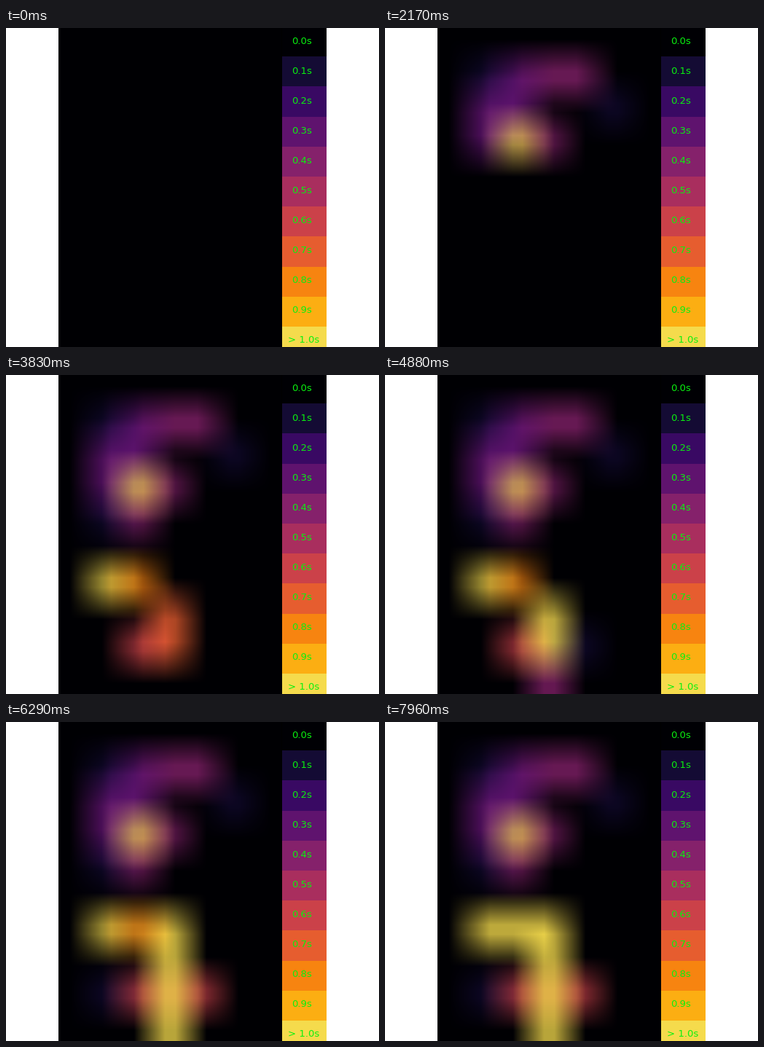
Write a matplotlib script that moves like this. It is 512x438 px and loops after 8000 ms.

```python
import numpy as np
import matplotlib.pyplot as plt
from matplotlib.animation import FuncAnimation
from matplotlib.patches import Rectangle

W, H, DPI = 512, 438, 100
LEFT, SPLIT, RIGHT = 72, 378, 440
ROWS, COLS = 10, 7
BLUR = 57
STEP_MS, LOOP_MS = 40, 8000
GREEN = (0.04, 0.94, 0.06)

# Legend levels, one per tenth of a second
COLORS = plt.get_cmap("inferno")(np.arange(11) / 11)[:, :3]

# Each walk: start ms, end ms, then legs of (first cell, last cell, tenths per cell)
WALKS = [
    (880, 1280, [((1, 1), (1, 1), 1), ((1, 2), (2, 2), 3), ((2, 1), (3, 1), 3),
                 ((3, 2), (3, 2), 10), ((3, 3), (3, 3), 4)]),
    (1310, 1660, [((1, 3), (1, 4), 4), ((2, 5), (2, 5), 1)]),
    (3000, 3800, [((4, 1), (4, 1), 1), ((4, 2), (4, 2), 4), ((6, 1), (6, 1), 10),
                  ((6, 2), (6, 2), 8), ((8, 2), (8, 2), 6), ((8, 3), (7, 3), 7)]),
    (3850, 4860, [((7, 3), (8, 3), 3), ((8, 4), (8, 4), 1), ((9, 3), (9, 3), 4)]),
    (4900, 6250, [((9, 3), (9, 3), 6), ((6, 3), (6, 3), 10),
                  ((8, 4), (8, 4), 5), ((8, 1), (8, 1), 1)]),
    (6330, 7100, [((6, 2), (6, 2), 2)]),
]


def walk_ticks(start, end, legs):
    """Spread a walk's tenths evenly over its time, cell after cell."""
    cells = []
    for (r0, c0), (r1, c1), tenths in legs:
        count = max(abs(r1 - r0), abs(c1 - c0)) + 1
        for row, col in zip(np.linspace(r0, r1, count), np.linspace(c0, c1, count)):
            cells += [(round(row), round(col))] * tenths
    return list(zip(np.linspace(start, end, len(cells)), cells))


TICKS = [tick for walk in WALKS for tick in walk_ticks(*walk)]


def blur_weights(size, cells):
    """Box-blurred profile of every cell along one axis."""
    cell = np.arange(size) * cells // size
    half = BLUR // 2
    padded = np.pad(np.eye(cells)[cell], ((half, half), (0, 0)), mode="edge")
    box = np.full(BLUR, 1 / BLUR)
    return np.stack([np.convolve(p, box, "valid") for p in padded.T], axis=1)


ROW_W = blur_weights(H, ROWS)
COL_W = blur_weights(SPLIT - LEFT, COLS)


def heat_at(ms):
    levels = np.zeros((ROWS, COLS), int)
    for when, cell in TICKS:
        if when <= ms:
            levels[cell] += 1
    cells = COLORS[np.minimum(levels, 10)]
    channels = [ROW_W @ cells[..., k] @ COL_W.T for k in range(3)]
    return np.clip(np.stack(channels, axis=-1), 0, 1)


def draw_legend(ax):
    for k, color in enumerate(COLORS):
        top = max(0, round(41.2 * k - 2))
        ax.add_patch(Rectangle((SPLIT + 1, top), RIGHT - SPLIT - 1, H - top,
                               color=color, lw=0, zorder=2, antialiased=False))
        label, x = (f"0.{k}s", 406.3) if k < 10 else ("> 1.0s", 408.8)
        ax.text(x, 21.5 + 41.1 * k, label, color=GREEN, ha="center",
                va="baseline", family="DejaVu Sans", size=13.2 * 72 / DPI, zorder=3)


fig = plt.figure(figsize=(W / DPI, H / DPI), dpi=DPI, facecolor="white")
ax = fig.add_axes([0, 0, 1, 1])
ax.add_patch(Rectangle((LEFT, 0), RIGHT - LEFT, H, color="black", lw=0, zorder=0))
heat = ax.imshow(heat_at(0), extent=(LEFT, SPLIT, H, 0), aspect="auto",
                 interpolation="nearest", zorder=1)
draw_legend(ax)
ax.set_xlim(0, W)
ax.set_ylim(H, 0)
ax.axis("off")


def update(frame):
    heat.set_data(heat_at(frame * STEP_MS))
    return [heat]


anim = FuncAnimation(fig, update, frames=LOOP_MS // STEP_MS,
                     interval=STEP_MS, repeat=True, repeat_delay=0)
plt.show()
```
